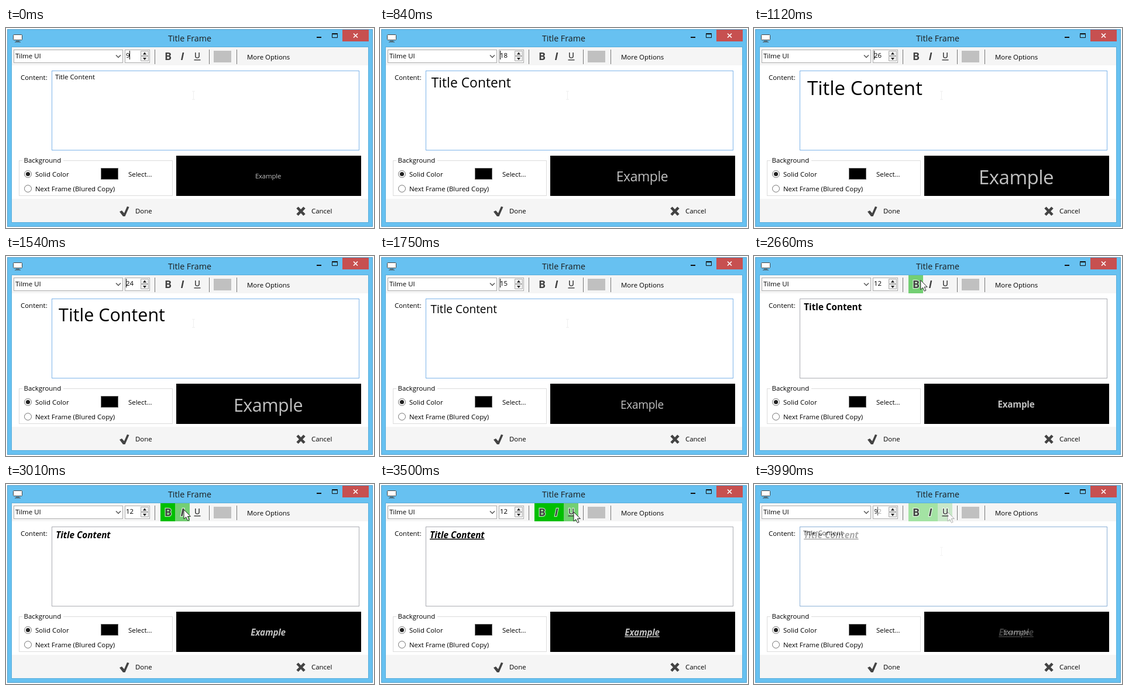
An HTML page for the animation above (4.06 s loop, 629x343 px).

```html
<!DOCTYPE html>
<html lang="en">
<head>
<meta charset="utf-8">
<title>Title Frame</title>
<style>
  html, body { margin: 0; width: 100%; height: 100%; overflow: hidden; background: #fff; }
  svg { display: block; width: 629px; height: 343px; font: 11.45px "Open Sans", "Noto Sans", sans-serif; }
  text { white-space: pre; }
  .tool { font-size: 18px; font-weight: 700; fill: #434343; stroke: #fff; stroke-opacity: .7; stroke-width: 2.4px; paint-order: stroke; text-anchor: middle; }
  .sample { fill: #c0c0c0; text-anchor: middle; letter-spacing: -.017em; }
</style>
</head>
<body>
<svg viewBox="0 0 629 343">
  <!-- window chrome -->
  <rect x="2.5" y="2.5" width="624" height="338" fill="#67c1f1" stroke="#4f9cc8"/>
  <rect x="9.5" y="32.5" width="610" height="301" fill="#fff" stroke="#5aaedb"/>
  <path d="M10 33h609v31H10zM10 293h609v40H10z" fill="#f5f5f5"/>
  <rect x="12.5" y="11.5" width="15" height="9" rx="1" fill="#fff" stroke="#444"/>
  <path d="M17 22.5h6M15 24h10" stroke="#444"/>
  <text x="314" y="22.5" font-size="14.3" text-anchor="middle" fill="#1c1c1c">Title Frame</text>
  <path d="M531 15h8v2h-8z" fill="#111"/>
  <path d="M557.5 10.5h9v6h-9zM557 9.5h10" fill="none" stroke="#111"/>
  <path d="M575 3h45v20h-45z" fill="#c75050"/>
  <path d="M594 9.5l7 7m0-7l-7 7" stroke="#fff" stroke-width="1.7"/>

  <!-- toolbar -->
  <g fill="#fff" stroke="#acacac">
    <rect x="13.5" y="37.5" width="186" height="22"/>
    <rect x="203.5" y="37.5" width="42" height="22"/>
    <path d="M230.5 39.5h13v8h-13zM230.5 48.5h13v8h-13z" fill="#f0f0f0"/>
  </g>
  <text x="16" y="52">Tilme UI</text>
  <path d="M188 46.5l4 4 4-4" fill="none" stroke="#555" stroke-width="1.5"/>
  <path d="M234 45.5l3-4 3 4zM234 51l3 4 3-4z" fill="#222"/>
  <path d="M254.5 37v25M347.5 37v25M394.5 37v25" stroke="#777"/>
  <path d="M355 39h30v20h-30z" fill="#c0c0c0"/>
  <text x="412" y="54">More Options</text>

  <!-- form -->
  <text x="25" y="89">Content:</text>
  <rect x="22.5" y="227.5" width="262" height="60" fill="none" stroke="#dcdcdc"/>
  <path d="M28 222h70v12H28z" fill="#fff"/>
  <text x="30.5" y="231">Background</text>
  <g fill="#fff" stroke="#707070">
    <circle cx="37.5" cy="250.5" r="6"/>
    <circle cx="37.5" cy="275.5" r="6"/>
  </g>
  <circle cx="37.5" cy="250.5" r="3.6" fill="#222"/>
  <text x="50" y="255">Solid Color</text>
  <rect x="162.5" y="240.5" width="29" height="19" stroke="#707070"/>
  <text x="209" y="255">Select...</text>
  <text x="50" y="280">Next Frame (Blured Copy)</text>
  <path d="M194 315l4-2 4 4.500 5-11.500 3.500 1-7 16h-3.500z" fill="#434343"/>
  <text x="221" y="318">Done</text>
  <path d="M498 308l12 12.500m0-12.500l-12 12.500" stroke="#434343" stroke-width="4.600"/>
  <text x="522" y="318">Cancel</text>

  <g id="live"></g>
</svg>
<script>
const LOOP = 4060, STEP = 70;
const live = document.getElementById("live");

// [time, point size]
const sizes = [[0, 9], [560, 11], [630, 13], [700, 15], [840, 18], [910, 20], [980, 23],
  [1120, 26], [1540, 24], [1610, 21], [1680, 18], [1750, 15], [1820, 12]];

// [time, x, y] of the pointer tip
const path = [[2100, 285, 60], [2310, 280, 41], [2590, 280, 41], [2940, 304, 44],
  [3080, 304, 44], [3430, 331, 48], [LOOP, 331, 48]];

// left edge and time of the switch
const tools = [{ x: 264, on: 2520 }, { x: 289, on: 3010 }, { x: 314, on: 3500 }];

const rect = (x, y, w, h, fill, more = "") =>
  `<rect x="${x}" y="${y}" width="${w}" height="${h}" fill="${fill}" ${more}/>`;
const text = (x, y, str, more = "") => `<text x="${x}" y="${y}" ${more}>${str}</text>`;

function pointer(t) {
  const i = path.findIndex(p => p[0] > t);
  if (i < 1) return null;
  const [a, b] = [path[i - 1], path[i]];
  const k = (t - a[0]) / (b[0] - a[0]);
  return [a[1] + (b[1] - a[1]) * k, a[2] + (b[2] - a[2]) * k];
}

function toolFill({ x, on }, t, tip) {
  const hover = tip && tip[0] >= x && tip[0] < x + 25;
  if (t >= on) return hover ? "#73cf73" : "#00bf00";
  if (t >= on - STEP) return "#c6c6c6";
  return hover ? "#dcdcdc" : "none";
}

function view(t) {
  const size = sizes.findLast(s => s[0] <= t)[1];
  const px = size * 4 / 3;
  const tip = pointer(t);
  const [bold, italic, under] = tools.map(b => t >= b.on);
  const font = `font-size="${px * .953}"` + (bold ? ' font-weight="700"' : "") +
    (italic ? ' font-style="italic"' : "") + (under ? ' text-decoration="underline"' : "");
  const border = t < 2100 ? "#7eb4ea" : t < 2450 ? "#94b3d3" : "#abadb3";
  const caret = t < 210 ? 211 : t >= 560 && t < 2100 ? 205 : 0;

  return rect(204, 38, 25, 21, "#fff") + text(205, 51, size) +
    (caret ? rect(caret, 39, 1, 15, "#000") : "") +
    rect(255, 33, 92, 31, "#f5f5f5") + rect(255, 64, 92, 9, "#fff") +
    tools.map(b => rect(b.x, 33, 25, 31, toolFill(b, t, tip))).join("") +
    text(277, 55, "B", 'class="tool"') +
    text(301.5, 55, "I", 'class="tool" font-style="italic"') +
    text(327, 52, "U", 'class="tool" style="font-size:14px;font-weight:600"') +
    rect(321.5, 54, 11, 1.5, "#434343") +
    '<path d="M254.5 37v25M347.5 37v25" stroke="#777"/>' +
    rect(78.5, 73.5, 525, 136, "#fff", `stroke="${border}"`) +
    (tip ? "" : '<path d="M318 108.500h5m-2.500 0v14m-2.500 0h5" stroke="#f0f0f0" fill="none"/>') +
    text(80.2 + .31 * px, 73.6 + 1.2 * px, "Title Content", font) +
    rect(291, 219, 316, 69, "#000") +
    text(448, 253.5 + .414 * px, "Example", font + ' class="sample"') +
    (tip ? `<path transform="translate(${tip})" d="M0 0v16l3.700-3.400 2.800 6 2.600-1.200-2.700-5.900h5z" fill="#fff" stroke="#222"/>` : "");
}

function draw(now) {
  const t = Math.floor(now % LOOP / STEP) * STEP;
  // the last two steps dissolve into the opening state
  const fade = Math.max(0, (t - 3850) / 210);
  live.innerHTML = view(t) + (fade ? `<g opacity="${fade}">${view(0)}</g>` : "");
}

const start = performance.now();
function tick() {
  draw(performance.now() - start);
  requestAnimationFrame(tick);
}
tick();
</script>
</body>
</html>
```
